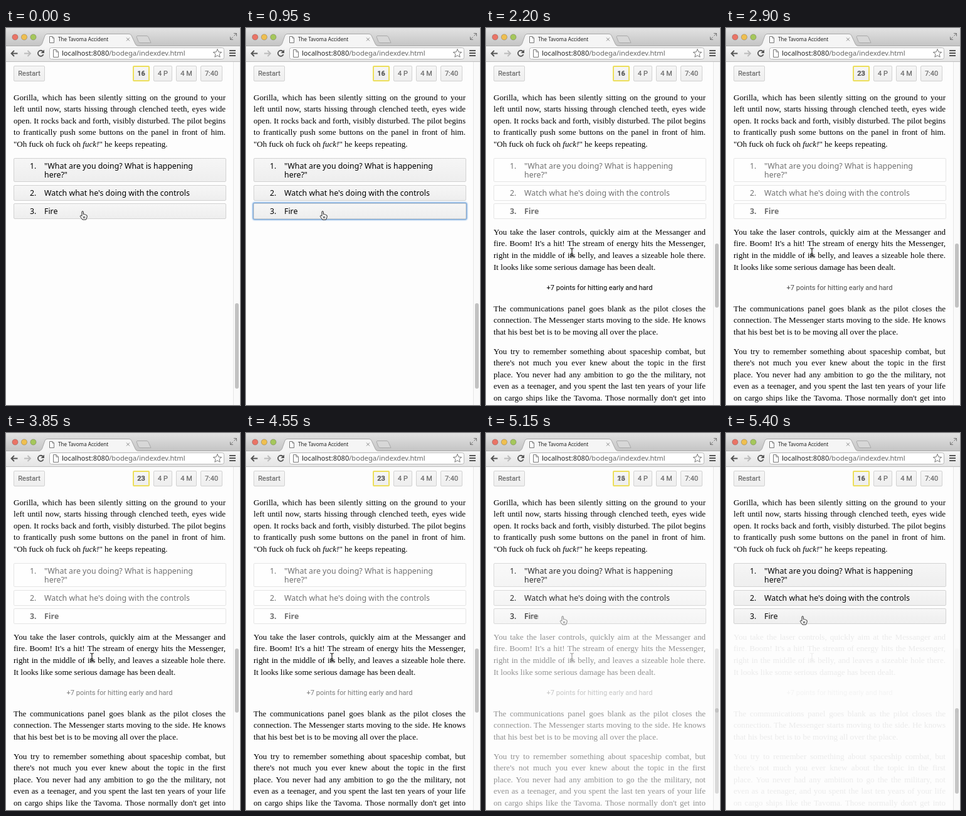
Recreate the animation shown at these times as an HTML page. Size 373x600 px, loop 5.45 s.

```html
<!DOCTYPE html>
<html lang="en">
<head>
<meta charset="utf-8">
<title>Story page</title>
<style>
  html, body { margin: 0; width: 100%; height: 100%; overflow: hidden; background: #fdfdfd; }
  #stage { position: relative; width: 373px; height: 600px; overflow: hidden; }
  #stage > *, .view > * { position: absolute; }
  .view { inset: 0; background: #fdfdfd; }
  p { margin: 0; left: 12px; width: 338px; color: #000; white-space: nowrap;
      font: 13.08px/18.6px "Liberation Serif", serif; }
  p span { display: block; text-align-last: justify; }
  p:not(.open) span:last-child { text-align-last: left; }
  .box { box-sizing: border-box; border: 1px solid #d2d2d2; border-radius: 2px;
         background: linear-gradient(#f6f6f6, #eee); }
  .badge { top: 60px; height: 25px; text-align: center; color: #666;
           font: 11px/23px Roboto, "Liberation Sans", sans-serif; -webkit-text-stroke: .2px; }
  .score { border: 2px solid #eddf5c; line-height: 21px; font-weight: bold; color: #555; }
  .choices { inset: 0; }
  .choice { position: absolute; left: 12px; width: 339px; padding: 5px 0 0 48px; color: #000;
            font: 12.38px/13.5px "Noto Sans", sans-serif; white-space: nowrap; }
  .choice i { position: absolute; left: 25px; font-style: normal; }
  .used .choice { background: #fff; }
  .used .choice:last-child { font-weight: bold; }
  .focus .choice:last-child { box-shadow: 0 0 0 1px #7fa9d6, 0 0 2px 2px #8db8e6; }
  .points { left: 12px; width: 338px; top: 406px; text-align: center;
            font: 11.1px/16px Roboto, "Liberation Sans", sans-serif; }
  .track { left: 362px; top: 54px; width: 10px; height: 546px; background: #fafafa; border-left: 1px solid #e6e6e6; }
  .thumb { left: 365px; width: 6px; border-radius: 3px; background: #c2c2c2; }
  .cursor { left: 0; top: 0; width: 24px; height: 24px; overflow: visible; }
  .cursor path { stroke-linejoin: round; stroke-linecap: round; }
  .chrome text { font-family: "Noto Sans", sans-serif; }
</style>
</head>
<body>
<div id="stage">
  <div class="view" id="live">
    <div class="box badge" style="left:12px;width:50px">Restart</div>
    <div class="box badge score" style="left:202px;width:27px">16</div>
    <div class="box badge" style="left:235px;width:30px">4 P</div>
    <div class="box badge" style="left:271px;width:33px">4 M</div>
    <div class="box badge" style="left:310px;width:35px">7:40</div>
    <div class="choices">
      <div class="box choice" style="top:207px;height:38px"><i>1.</i>"What are you doing? What is happening<br>here?"</div>
      <div class="box choice" style="top:250px;height:25px"><i>2.</i>Watch what he's doing with the controls</div>
      <div class="box choice" style="top:279px;height:25px"><i>3.</i>Fire</div>
    </div>
    <div class="points outcome">+7 points for hitting early and hard</div>
    <div class="track"></div>
    <div class="thumb"></div>
    <svg class="cursor">
      <path class="hand" fill="#fff" stroke="#222" d="M3.5 8V2Q3.5 .5 4.6 .5T5.8 2V5.5Q7.6 4.6 8 6Q9.6 5.4 10 6.7Q11.6 6.4 11.6 8V10L10 14H4.4L1 9.4Q.2 7.6 1.6 7.4ZM6 9v2.5M8 9v2.5"/>
      <path class="arrow" fill="#111" stroke="#fff" stroke-width=".8" d="M0 0V11.5L2.6 9.1L4.4 13L6.3 12.1L4.6 8.4H8.2Z"/>
      <path class="beam" fill="none" stroke="#222" stroke-width="1.2" d="M-2.5 -6.5Q0 -6.5 0 -4.5Q0 -6.5 2.5 -6.5M0 -4.5V4.5M-2.5 6.5Q0 6.5 0 4.5Q0 6.5 2.5 6.5M-1.5 2H1.5"/>
    </svg>
  </div>

  <svg class="chrome" width="373" height="54" fill="none">
    <defs>
      <linearGradient id="bar" x2="0" y2="1"><stop stop-color="#e2e2e2"/><stop offset="1" stop-color="#c4c4c4"/></linearGradient>
      <linearGradient id="tools" x2="0" y2="1"><stop stop-color="#f5f5f5"/><stop offset="1" stop-color="#e4e4e4"/></linearGradient>
    </defs>
    <path fill="url(#bar)" d="M0 0H373V29H0Z"/>
    <g stroke="#0004" stroke-width=".8">
      <circle cx="14.5" cy="14.5" r="4.6" fill="#ea7467"/>
      <circle cx="29" cy="14.5" r="4.6" fill="#efbf50"/>
      <circle cx="43.5" cy="14.5" r="4.6" fill="#a5c75b"/>
    </g>
    <path fill="url(#tools)" d="M0 28H373V54H0Z"/>
    <path stroke="#bdbdbd" d="M0 53.5H373"/>
    <path fill="#f5f5f5" stroke="#a8a8a8" d="M0 28.5H53Q56 28 57.5 25L62 12Q63 9.5 66 9.5H196Q199 9.5 200 12L206 25Q207.500 28.500 210 28.500H373"/>
    <path fill="#f5f5f5" d="M54 29H210V30H54Z"/>
    <path fill="#d7d7d7" stroke="#aaa" d="M209 12.500H224Q226 12.500 227 14.500L231 23.500H214Q212 23.500 211 21.500L208 14Z"/>
    <g fill="#fff" stroke="#777">
      <path d="M69.500 13.500H74L76.500 16V23.500H69.500ZM74 13.500V16H76.500"/>
      <rect x="69.500" y="31.500" width="278" height="18" rx="3" stroke="#b9b9b9"/>
      <path d="M75.500 34.500H80L83.500 38V46.500H75.500ZM80 34.500V38H83.500"/>
      <path d="M337 33.500L338.900 38.100L343.700 38.500L340 41.600L341.200 46.300L337 43.700L332.800 46.300L334 41.600L330.300 38.500L335.100 38.100Z"/>
    </g>
    <path stroke="#888" d="M192 15.500L197 20.500M197 15.500L192 20.500"/>
    <path stroke="#555" stroke-width="1.800" d="M18.500 40.500H9M13 36L8.500 40.500L13 45"/>
    <path stroke="#bbb" stroke-width="1.800" d="M29 40.500H38.500M34.500 36L39 40.500L34.500 45"/>
    <path stroke="#555" stroke-width="1.800" d="M59 37.500A4.500 4.500 0 1 0 59.600 42"/>
    <path fill="#555" d="M61 34.500V40H55.500Z"/>
    <path stroke="#555" stroke-width="2" d="M356 36H366M356 40H366M356 44H366"/>
    <path stroke="#777" d="M363 8.500H367.500V13M367 9L363.500 12.500M357.500 14V18.500H362M358 18L361.500 14.500"/>
    <text x="83" y="21.200" font-size="8.100" fill="#222">The Tavoma Accident</text>
    <text x="89" y="44.200" font-size="11.100" fill="#222">localhost:8080<tspan fill="#666">/bodega/indexdev.html</tspan></text>
  </svg>
</div>
<script>
const LOOP = 5450;
const live = document.getElementById('live');

function addParagraph(top, className, lines) {
  const p = document.createElement('p');
  p.className = className;
  p.style.top = top + 'px';
  p.innerHTML = lines.map(line => `<span>${line}</span>`).join('');
  live.insertBefore(p, live.querySelector('.track'));
}

addParagraph(101.7, '', [
  'Gorilla, which has been silently sitting on the ground to your',
  'left until now, starts hissing through clenched teeth, eyes wide',
  'open. It rocks back and forth, visibly disturbed. The pilot begins',
  'to frantically push some buttons on the panel in front of him.',
  '"Oh fuck oh fuck oh <em>fuck!</em>" he keeps repeating.']);
addParagraph(315.8, 'outcome', [
  'You take the laser controls, quickly aim at the Messanger and',
  'fire. Boom! It\'s a hit! The stream of energy hits the Messenger,',
  'right in the middle of its belly, and leaves a sizeable hole there.',
  'It looks like some serious damage has been dealt.']);
addParagraph(437.8, 'outcome', [
  'The communications panel goes blank as the pilot closes the',
  'connection. The Messenger starts moving to the side. He knows',
  'that his best bet is to be moving all over the place.']);
addParagraph(505.6, 'thoughts open', [
  'You try to remember something about spaceship combat, but',
  'there\'s not much you ever knew about the topic in the first',
  'place. You never had any ambition to go the the military, not',
  'even as a teenager, and you spent the last ten years of your life',
  'on cargo ships like the Tavoma. Those normally don\'t get into']);

const ramp = (t, from, to) => Math.min(1, Math.max(0, (t - from) / (to - from)));

// Places the pointer along a path of [time, x, y] points.
function along(points, t) {
  const i = Math.max(1, points.findIndex(p => p[0] > t));
  const [a, b] = t >= points.at(-1)[0] ? points.slice(-2) : [points[i - 1], points[i]];
  const k = ramp(t, a[0], b[0]);
  return [a[1] + (b[1] - a[1]) * k, a[2] + (b[2] - a[2]) * k];
}
const POINTER = [[0, 117.5, 291], [1050, 117.5, 291], [1450, 130, 319], [1600, 130, 319], [2000, 137, 357]];

function render(view, t) {
  const one = selector => view.querySelector(selector);
  const setOpacity = (selector, value) =>
    view.querySelectorAll(selector).forEach(el => el.style.opacity = value);

  const used = ramp(t, 1100, 1350);
  const choices = one('.choices');
  choices.classList.toggle('focus', t >= 850 && t < 1100);
  choices.classList.toggle('used', t >= 1150);
  choices.style.opacity = 1 - .45 * used;

  setOpacity('.outcome', ramp(t, 1100, 1400));
  setOpacity('.thoughts', ramp(t, 1700, 1950));
  const grey = 125 * ramp(t, 2300, 3300);
  one('.points').style.color = `rgb(${grey},${grey},${grey})`;
  one('.score').textContent = t < 2750 ? 16 : 23;

  // The thumb shrinks and rises as the document grows below the fold.
  const scale = 544 / (t < 1150 ? 2176 : t < 1700 ? 2367 : 2891);
  const thumb = one('.thumb').style;
  thumb.top = 54 + 1536 * scale + 'px';
  thumb.height = 544 * scale + 'px';

  const [x, y] = along(POINTER, t);
  one('.cursor').style.transform = `translate(${x}px,${y}px)`;
  const shape = t < 1100 ? 'hand' : t < 1700 ? 'arrow' : 'beam';
  for (const name of ['hand', 'arrow', 'beam'])
    one('.' + name).style.display = name === shape ? '' : 'none';
}

const opening = live.cloneNode(true);
opening.removeAttribute('id');
live.after(opening);
render(opening, 0);

function frame() {
  const t = performance.now() % LOOP;
  render(live, t);
  opening.style.opacity = ramp(t, 4750, LOOP);
  requestAnimationFrame(frame);
}
frame();
</script>
</body>
</html>
```
